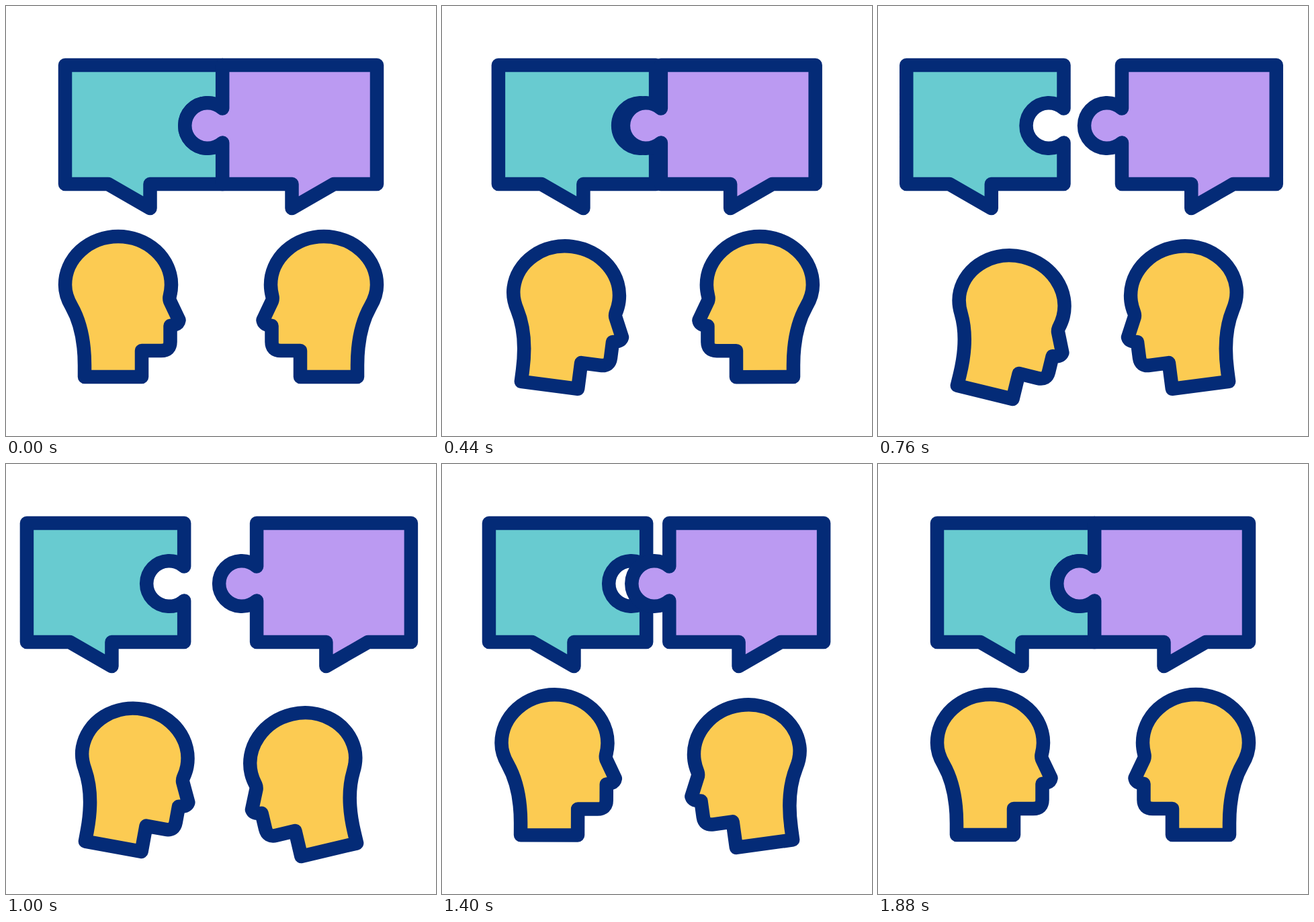
These frames come from a looping animation (640x640 px, 2000 ms). An HTML page:

```html
<!DOCTYPE html>
<html lang="en">
<head>
<meta charset="utf-8">
<title>Dialogue puzzle</title>
<style>
  html, body { margin: 0; width: 100%; height: 100%; overflow: hidden; background: #fff; }
  svg { display: block; width: 100%; height: 100%; }
  path { stroke: #042b77; stroke-width: 20.5; stroke-linejoin: round; stroke-linecap: round; }
</style>
</head>
<body>
<svg viewBox="0 0 640 640">
  <defs>
    <path id="head" fill="#fccb52" d="M117 552 V535 C117 500 110 469 97.5 447
      C91 436 88 426 88 415 A79 72 0 0 1 246 415
      C246 422 245 427 243.5 433 Q243 436 244 439
      L257.5 467.5 Q256.5 474.5 244.5 476 V500 Q244.5 513 231 513 H202 V552 Z"/>
  </defs>
  <path id="leftBubble" fill="#68cbd0" d="M88 88 H322.2 V152.5 A33.8 33.8 0 1 0 322.2 203.5
    V265 H214.5 V301 L152 265 H88 Z"/>
  <path id="rightBubble" fill="#bb9af2" d="M552 88 H322.2 V152.5 A33.8 33.8 0 1 0 322.2 203.5
    V265 H425.5 V301 L488 265 H552 Z"/>
  <use id="leftHead" href="#head"/>
  <g transform="translate(640 0) scale(-1 1)"><use id="rightHead" href="#head"/></g>
</svg>
<script>
  const LOOP = 2000, STEP = 40;
  const byId = id => document.getElementById(id);
  const leftBubble = byId('leftBubble'), rightBubble = byId('rightBubble');
  const leftHead = byId('leftHead'), rightHead = byId('rightHead');

  // Ease-in-out: cubic Bézier (.42, 0, .58, 1), solved by bisection
  function ease(x) {
    if (x <= 0) return 0;
    if (x >= 1) return 1;
    let low = 0, high = 1, u;
    for (let i = 0; i < 24; i++) {
      u = (low + high) / 2;
      const at = 1.26 * u * (1 - u) ** 2 + 1.74 * u * u * (1 - u) + u ** 3;
      if (at < x) low = u; else high = u;
    }
    return u * u * (3 - 2 * u);
  }

  // Rises from 0 to 1 at the peak time, then falls back to 0
  const swing = (t, start, peak, end) =>
    t < peak ? ease((t - start) / (peak - start)) : 1 - ease((t - peak) / (end - peak));

  const nod = t => `rotate(${13.7 * swing(t, 90, 760, 1460)} 64 562)`;

  function draw(t) {
    const apart = swing(t, 320, 960, 1680);
    leftBubble.setAttribute('transform', `translate(${-57.4 * apart} 0)`);
    rightBubble.setAttribute('transform', `translate(${51.2 * apart} 0)`);
    leftHead.setAttribute('transform', nod(t));
    rightHead.setAttribute('transform', nod(t - 320));
  }

  const began = performance.now();
  function tick() {
    const t = (performance.now() - began) % LOOP;
    draw(Math.floor(t / STEP) * STEP);
    requestAnimationFrame(tick);
  }
  tick();
</script>
</body>
</html>
```
